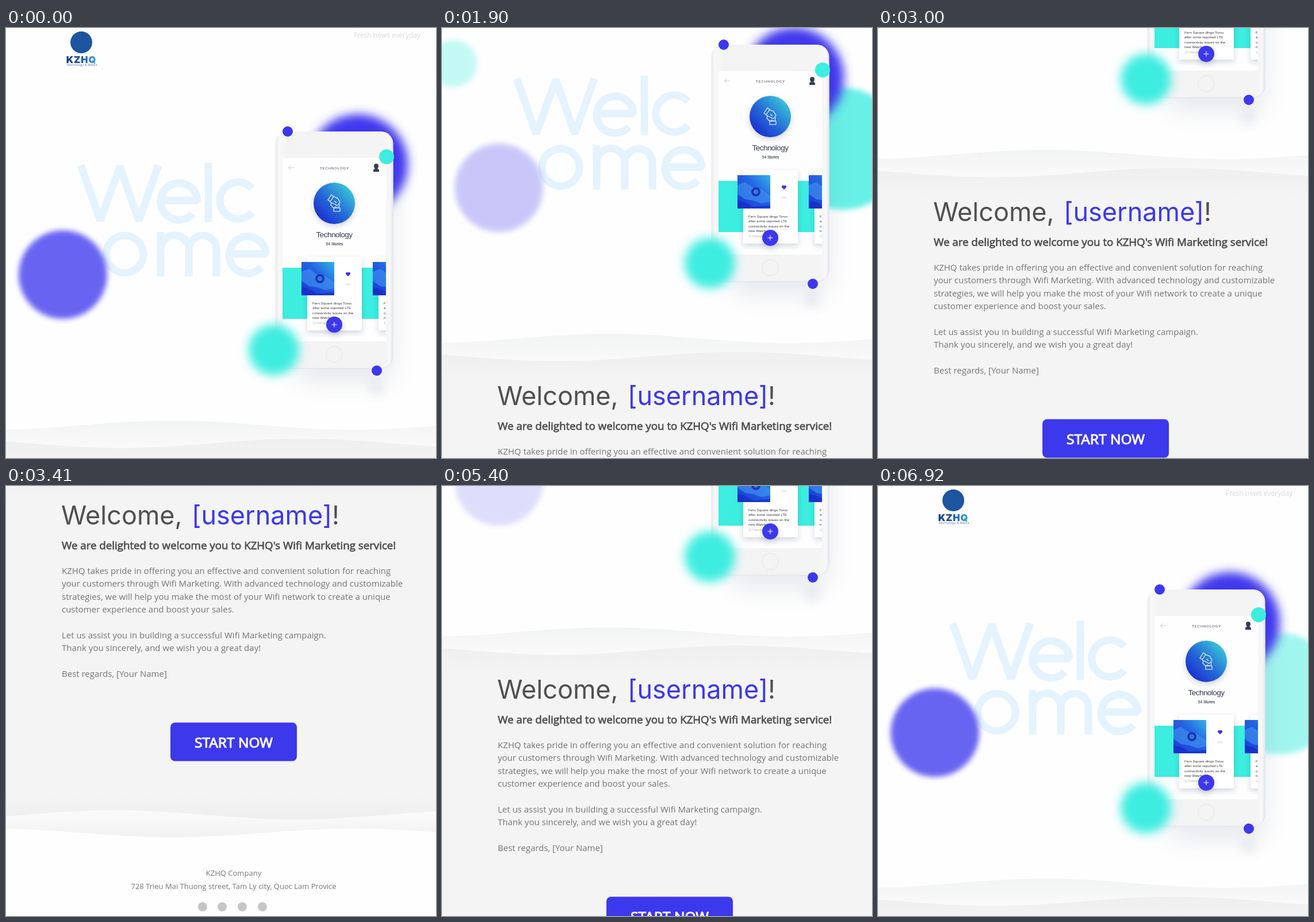
An HTML page for the animation above (7030 ms loop, 748 by 748 pixels).

```html
<!DOCTYPE html>
<html lang="en">
<head>
<meta charset="utf-8">
<title>Welcome mail</title>
<style>
  html, body { margin: 0; width: 100%; height: 100%; overflow: hidden; background: #fefefe; }
  svg { display: block; position: absolute; top: 0; left: 0; }
  text { font-family: "Open Sans", sans-serif; white-space: pre; }
  .body { font-size: 15px; fill: #757575; }
  .foot { font-size: 13px; fill: #777; text-anchor: middle; }
  .strong { stroke-width: .75; }
  .app text { font-family: "Liberation Sans", Arial, sans-serif; }
  .mid { text-anchor: middle; }
  .hero { fill: none; stroke: #e4f3fe; stroke-width: 13; stroke-linejoin: bevel; }
  .line { fill: none; stroke: #fff; stroke-width: 1.1; stroke-linejoin: round; }
</style>
</head>
<body>
<svg width="748" height="748" viewBox="0 0 748 748">
  <defs>
    <filter id="soft" x="-40%" y="-40%" width="180%" height="180%"><feGaussianBlur stdDeviation="5"/></filter>
    <filter id="softer" x="-80%" y="-80%" width="260%" height="260%"><feGaussianBlur stdDeviation="8.5"/></filter>
    <filter id="haze" x="-60%" y="-60%" width="220%" height="220%"><feGaussianBlur stdDeviation="20"/></filter>
    <filter id="drop" x="-50%" y="-50%" width="200%" height="200%">
      <feDropShadow dx="0" dy="4" stdDeviation="5" flood-color="#2a3560" flood-opacity=".2"/>
    </filter>
    <linearGradient id="brand"><stop stop-color="#173a88"/><stop offset=".5" stop-color="#1d559f"/><stop offset="1" stop-color="#31a9e4"/></linearGradient>
    <linearGradient id="case">
      <stop stop-color="#e9e9ec"/><stop offset=".03" stop-color="#f8f8f8"/><stop offset=".1" stop-color="#f3f3f4"/>
      <stop offset=".93" stop-color="#f4f4f4"/><stop offset=".97" stop-color="#f8f8f9"/><stop offset="1" stop-color="#e6e8ed"/>
    </linearGradient>
    <linearGradient id="badge" x1=".1" y1=".9" x2=".9" y2=".1">
      <stop stop-color="#1b2bd0"/><stop offset=".45" stop-color="#2467d6"/><stop offset="1" stop-color="#3accd8"/>
    </linearGradient>
    <linearGradient id="photo" x1="0" y1="1" x2="1" y2="0">
      <stop stop-color="#1a35d8"/><stop offset=".6" stop-color="#2465e2"/><stop offset="1" stop-color="#33b5e6"/>
    </linearGradient>
    <linearGradient id="hill1" gradientUnits="userSpaceOnUse" x1="0" y1="682" x2="0" y2="730"><stop stop-color="#f2f3f3"/><stop offset="1" stop-color="#fafafa"/></linearGradient>
    <linearGradient id="hill2" gradientUnits="userSpaceOnUse" x1="0" y1="713" x2="0" y2="765"><stop stop-color="#efefef"/><stop offset="1" stop-color="#f4f4f4"/></linearGradient>
    <linearGradient id="dale1" gradientUnits="userSpaceOnUse" x1="0" y1="1280" x2="0" y2="1320"><stop stop-color="#f4f4f4"/><stop offset="1" stop-color="#eee"/></linearGradient>
    <linearGradient id="dale2" gradientUnits="userSpaceOnUse" x1="0" y1="1304" x2="0" y2="1351"><stop stop-color="#fbfbfb"/><stop offset="1" stop-color="#f2f2f2"/></linearGradient>
    <clipPath id="screen"><path d="M481 226h180v319h-180z"/></clipPath>
  </defs>

  <g id="page">
    <rect width="748" height="1488" fill="#fefefe"/>

    <!-- header -->
    <circle cx="131" cy="25" r="19" fill="#1d559f"/>
    <text x="131" y="61" class="mid" style="font:900 16.5px Inter,sans-serif" letter-spacing=".8" fill="url(#brand)">KZHQ</text>
    <text x="132" y="66" class="mid" font-size="5.7" fill="#5b76ad">Technology &amp; Media</text>
    <text x="605" y="17" font-size="12" fill="#d9d9d9">Fresh news everyday</text>

    <!-- large lettering -->
    <g class="hero" role="img" aria-label="Welcome">
      <path d="M130 239L164 335 198 241 231 335 265 239"/>
      <path id="e" d="M270 300H333A32 32 0 1 0 325 323"/>
      <path d="M352 234V337M428 279A32 32 0 1 0 428 321"/>
      <circle cx="206.5" cy="393.5" r="32.5"/>
      <path d="M269 432V355M269 385a24.5 24.5 0 0 1 49 0V432M318 385a24 24 0 0 1 48 0V432"/>
      <use href="#e" x="119" y="93"/>
    </g>

    <!-- glowing discs -->
    <circle id="violet" cx="99" cy="429" r="77" fill="#3d38ee" filter="url(#soft)"/>
    <circle id="mint" cx="20" cy="213" r="41" fill="#3cede0" filter="url(#soft)"/>
    <circle id="aqua" cx="697" cy="361" r="106" fill="#3cede0" filter="url(#soft)"/>
    <circle cx="612" cy="237" r="87" fill="#4038ec" filter="url(#softer)"/>

    <!-- phone -->
    <rect x="500" y="260" width="175" height="355" rx="30" fill="#6a7490" opacity=".15" filter="url(#haze)"/>
    <circle cx="645" cy="625" r="15" fill="#8088a0" opacity=".12" filter="url(#softer)"/>
    <rect x="468.500" y="180" width="205" height="412" rx="21" fill="url(#case)"/>
    <path d="M469 560v11a21 21 0 0 0 21 21h162a21 21 0 0 0 21-21V210" fill="none" stroke="#dfe2ea"/>
    <circle cx="571" cy="568" r="14" fill="none" stroke="#e7e7ea"/>

    <g class="app" clip-path="url(#screen)">
      <rect x="481" y="226" width="180" height="319" fill="#fefefe"/>
      <path d="M501 243h-9.500m4-4l-4 4 4 4" fill="none" stroke="#c9c9cd"/>
      <text x="571.500" y="245.500" class="mid" font-size="6" letter-spacing=".9" fill="#666a78" stroke="#666a78" stroke-width=".15">TECHNOLOGY</text>
      <path d="M639 250v-2q0-3 3-3-2-2-2-5 0-4 4-4t4 4q0 3-2 5 3 0 3 3v2z" fill="#353d5c"/>

      <circle cx="571" cy="305" r="36" fill="url(#badge)" filter="url(#drop)"/>
      <g class="line">
        <path d="M560 299l6-9 4 3-6 9zM569 293l8 3 4 7-5 6-5-3-7-3M566 303l-1 5 5 5 7-1M571 301l4 3"/>
        <path d="M570 313h11v6h-11zM573 313v-3M579 313l1-7"/>
      </g>
      <text x="571" y="364" class="mid" font-size="13.500" letter-spacing="-.55" fill="#343a50">Technology</text>
      <text x="571.500" y="378" class="mid" font-size="6.500" fill="#343a50" stroke="#343a50" stroke-width=".15">54 Stories</text>

      <path d="M481 417h180v89H481z" fill="#3cede0"/>
      <g id="card">
        <path d="M524 398h95v128h-95z" fill="#fff" filter="url(#drop)"/>
        <path d="M514 407h57v58h-57z" fill="url(#photo)"/>
        <path d="M514 424l13-5 16 11 12 1 16 12v10l-15 3-15-5-14-2-13-9z" fill="#3f93ee" opacity=".65"/>
        <path d="M514 451l14 3 13 8 30-3v6h-57z" fill="#1425bd" opacity=".55"/>
        <circle cx="546" cy="436" r="6" fill="#3779df" stroke="#1b37b8" stroke-width="4"/>
        <g id="news" font-size="6.250" fill="#3b3b42"></g>
        <text x="533" y="515" font-size="5" fill="#b5b5ba">12 February</text>
      </g>
      <use href="#card" x="124"/>
      <path d="M595 432l-3.600-3.600a2.200 2.200 0 0 1 3.600-2.700 2.200 2.200 0 0 1 3.600 2.700z" fill="#3b2fe2"/>
      <text x="595" y="447.500" class="mid" font-size="5.500" fill="#cfcfd4">286</text>
      <circle cx="571" cy="516" r="14" fill="#3c38ec" filter="url(#drop)"/>
      <path d="M566.500 516h9m-4.500-4.500v9" class="line"/>
    </g>

    <circle cx="490" cy="180" r="9" fill="#3c38ec"/>
    <circle cx="662" cy="224" r="13" fill="#3cede0"/>
    <circle cx="645" cy="596" r="9" fill="#3c38ec"/>
    <circle cx="466" cy="560" r="44" fill="#3cede0" filter="url(#softer)"/>

    <g id="waves"></g>

    <!-- message -->
    <text x="96" y="807" style="font:400 45px Inter,sans-serif" fill="#505052">Welcome, <tspan x="323" fill="#3c38ec">[username]</tspan><tspan x="567">!</tspan></text>
    <text x="97" y="850" class="strong" font-size="18.720" fill="#505052" stroke="#505052">We are delighted to welcome you to KZHQ's Wifi Marketing service!</text>
    <g id="letter" class="body"></g>
    <rect x="286" y="1151.500" width="220" height="67" rx="8" fill="#3c38ec"/>
    <text x="396" y="1194.500" class="mid" font-size="24.500" fill="#fff" stroke="#fff" stroke-width="1.1">START NOW</text>

    <!-- footer -->
    <text x="396" y="1418" class="foot">KZHQ Company</text>
    <text x="396" y="1441" class="foot">728 Trieu Mai Thuong street, Tam Ly city, Quoc Lam Provice</text>
    <g fill="#c6c6c6">
      <circle cx="342" cy="1472" r="8"/><circle cx="376" cy="1472" r="8"/>
      <circle cx="411" cy="1472" r="8"/><circle cx="446" cy="1472" r="8"/>
    </g>
  </g>
</svg>
<script>
const LOOP = 7030, STEP = 100;
const get = id => document.getElementById(id);

function setLines(id, x, y, leading, text) {
  get(id).innerHTML = text.split('\n')
    .map((line, i) => `<text x="${x}" y="${y + i * leading}">${line}</text>`).join('');
}

setLines('news', 533, 481, 8.3, `Fern Square dings Torvu
after some reported LTE
connectivity issues on the
new Watch`);

setLines('letter', 97, 893, 22.4, `KZHQ takes pride in offering you an effective and convenient solution for reaching
your customers through Wifi Marketing. With advanced technology and customizable
strategies, we will help you make the most of your Wifi network to create a unique
customer experience and boost your sales.

Let us assist you in building a successful Wifi Marketing campaign.
Thank you sincerely, and we wish you a great day!

Best regards, [Your Name]`);

// A band from a cosine edge (first extreme at x0, up or down) to the given bottom.
function wave(fill, middle, x0, height, bottom) {
  let d = `M0 ${bottom}`;
  for (let x = 0; x <= 748; x += 11) {
    d += `L${x} ${(middle - height * Math.cos(Math.PI * (x - x0) / 315)).toFixed(1)}`;
  }
  return `<path d="${d}V${bottom}z" fill="${fill}"/>`;
}
get('waves').innerHTML =
  wave('url(#hill1)', 691, 290, 8, 740) +
  wave('url(#hill2)', 722.5, 200, -8, 1280) +
  '<path d="M0 1279H748V1345H0z" fill="url(#dale1)"/>' +
  wave('url(#dale2)', 1312, 190, 8, 1360) +
  wave('#fefefe', 1343.5, 290, -7.5, 1488);

const clamp = u => Math.min(1, Math.max(0, u));

// Eased scroll stroke between two moments.
function flick(t, from, to, distance) {
  const u = clamp((t - from) / (to - from));
  return distance * u * u * (3 - 2 * u);
}

function scrollAt(t) {
  return flick(t, 1435, 2000, 165) + flick(t, 2100, 2400, 116)
    + flick(t, 2500, 2800, 159) + flick(t, 2900, 3400, 300)
    - flick(t, 4600, 4900, 80) - flick(t, 5080, 5900, 660);
}

// Opacity rises to 1 and falls again; the discs glow once more after PERIOD.
const PERIOD = 6130;
const tent = (t, start, peak, end) =>
  clamp(Math.min((t - start) / (peak - start), (end - t) / (end - peak)));
const glow = (t, ...times) => Math.max(tent(t, ...times), tent(t - PERIOD, ...times));

function draw() {
  const t = Math.floor(performance.now() % LOOP / STEP) * STEP;
  get('page').setAttribute('transform', `translate(0 ${-Math.round(scrollAt(t))})`);
  get('violet').setAttribute('opacity', glow(t, -920, 270, 2500));
  get('aqua').setAttribute('opacity', glow(t, 300, 1280, 4080));
  get('mint').setAttribute('opacity', glow(t, 1420, 3000, 4000));
  requestAnimationFrame(draw);
}
draw();
</script>
</body>
</html>
```
